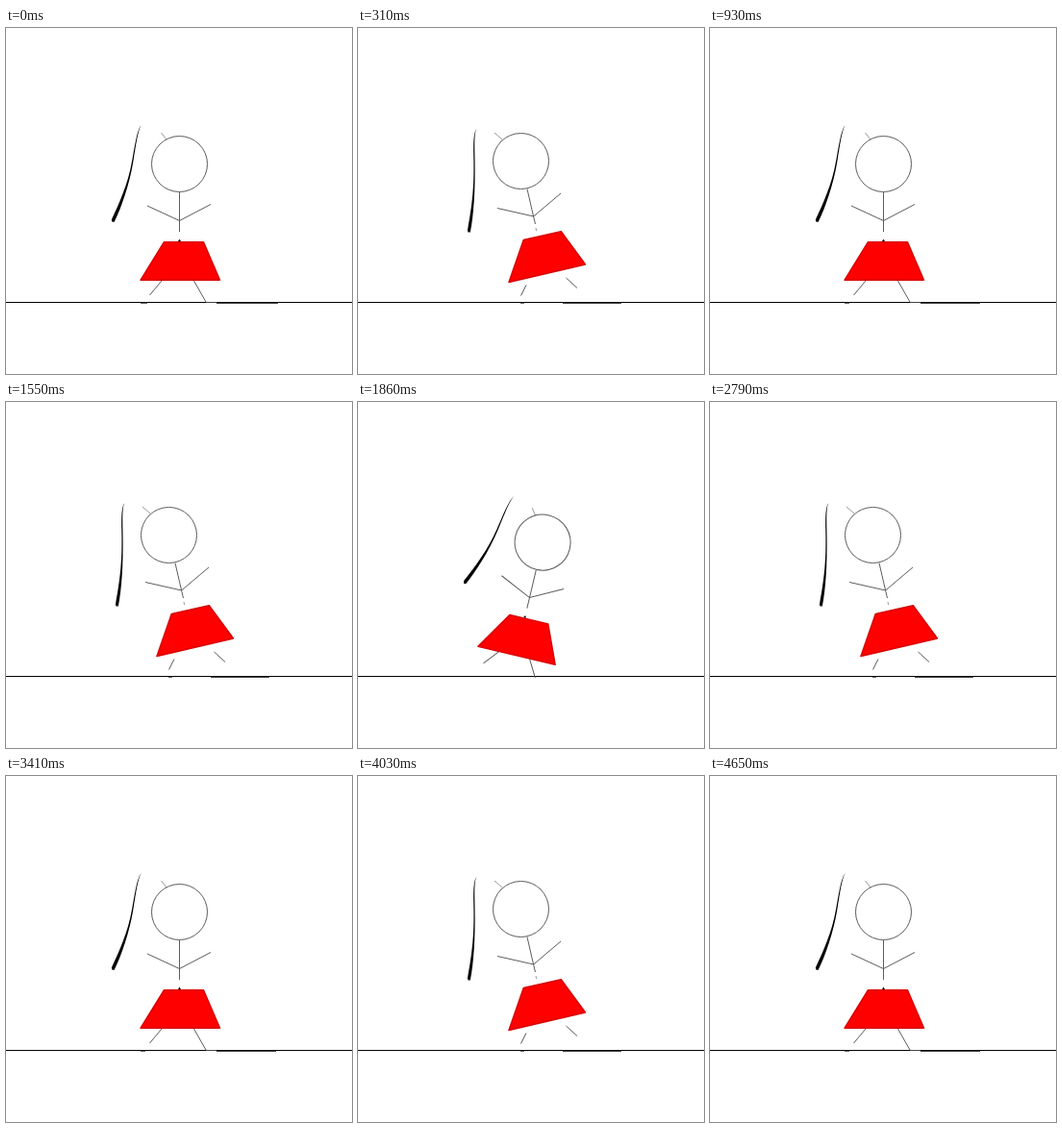
Animation of 360 by 360 pixels, one loop 4960 ms. Source, as an HTML page without scripts:

```html
<!DOCTYPE html>
<html lang="en">
<head>
<meta charset="utf-8">
<title>Swaying stick figure</title>
<style>
html, body { margin: 0; width: 100%; height: 100%; overflow: hidden; background: #fff; }
svg { display: block; width: 100vw; height: 100vh; }
.line { fill: none; stroke: #5c5c5c; stroke-width: 1; }
.faint { stroke: #999; }
.skirt { fill: #f00; stroke: #d80000; stroke-width: 1.5; stroke-linejoin: round; }
.pose { visibility: hidden; animation: 1240ms step-end infinite; }
.rest { animation-name: rest; }
.left { animation-name: left; }
.right { animation-name: right; }
.start { visibility: hidden; animation: start 4960ms step-end infinite; }
@keyframes rest { 0%, 75% { visibility: visible; } 25% { visibility: hidden; } }
@keyframes left { 0%, 50% { visibility: hidden; } 25% { visibility: visible; } }
@keyframes right { 0%, 75% { visibility: hidden; } 50% { visibility: visible; } }
@keyframes start { 0% { visibility: visible; } 6.25% { visibility: hidden; } }
</style>
</head>
<body>
<svg viewBox="0 0 360 360">
  <defs>
    <clipPath id="floor"><path d="M0 0H360V287H0Z"/></clipPath>
    <g id="girl">
      <path d="M140.5 101C136 108 134.5 120 131 139C127 162 118 182 109.8 199.5L110.5 201.8L112.7 201.8C120 187 128.3 163 132.2 140C135.3 121 137 108 140.5 101Z"/>
      <path class="line faint" d="M161.5 109L167 116"/>
      <circle class="line" cx="180.5" cy="141.5" r="29"/>
      <path class="line" d="M180.5 171V212M147 185L180.5 200.5L213 183.5"/>
      <path d="M179 222L180.5 219.5L182 222Z"/>
      <path class="line" d="M162 263L149.5 278M195.5 263L208 285"/>
      <path class="skirt" d="M164.5 222.7H205.5L222.5 262.3H140Z"/>
    </g>
  </defs>

  <path d="M0 285H360V286H0Z"/>

  <g class="pose rest">
    <use href="#girl"/>
    <path d="M208 285.5H219M219 286.5H281M140 286.3H145" stroke="#444"/>
  </g>
  <path class="start" d="M281 286.5H283M145 286.3H147" stroke="#444"/>

  <g class="pose left">
    <path d="M123.5 105C120 109 120 120 120.3 135C121 168 118.5 185 114 210.5L114.5 212.6L116.8 212.6C120.3 195 122.2 170 121.5 135C121.2 118 121 109 123.5 105Z"/>
    <path class="line faint" d="M142 109L150 116"/>
    <circle class="line" cx="169.5" cy="138.5" r="29"/>
    <path class="line" d="M176 167.5L182.7 196.5L184.5 204M145 187.5L182.7 196L211 172"/>
    <path class="line faint" d="M185 208L185.7 211"/>
    <path class="line" d="M175 267.5L169.5 278.5M216.5 260L228 270.5"/>
    <path class="skirt" d="M172.3 220.5L211.3 211.7L236.5 246L157 264.5Z"/>
    <path d="M213 286.5H274M169 286.3H173" stroke="#444"/>
  </g>

  <g class="pose right" clip-path="url(#floor)">
    <use href="#girl" transform="rotate(13.3 166.5 193.5)"/>
  </g>
</svg>
</body>
</html>
```
